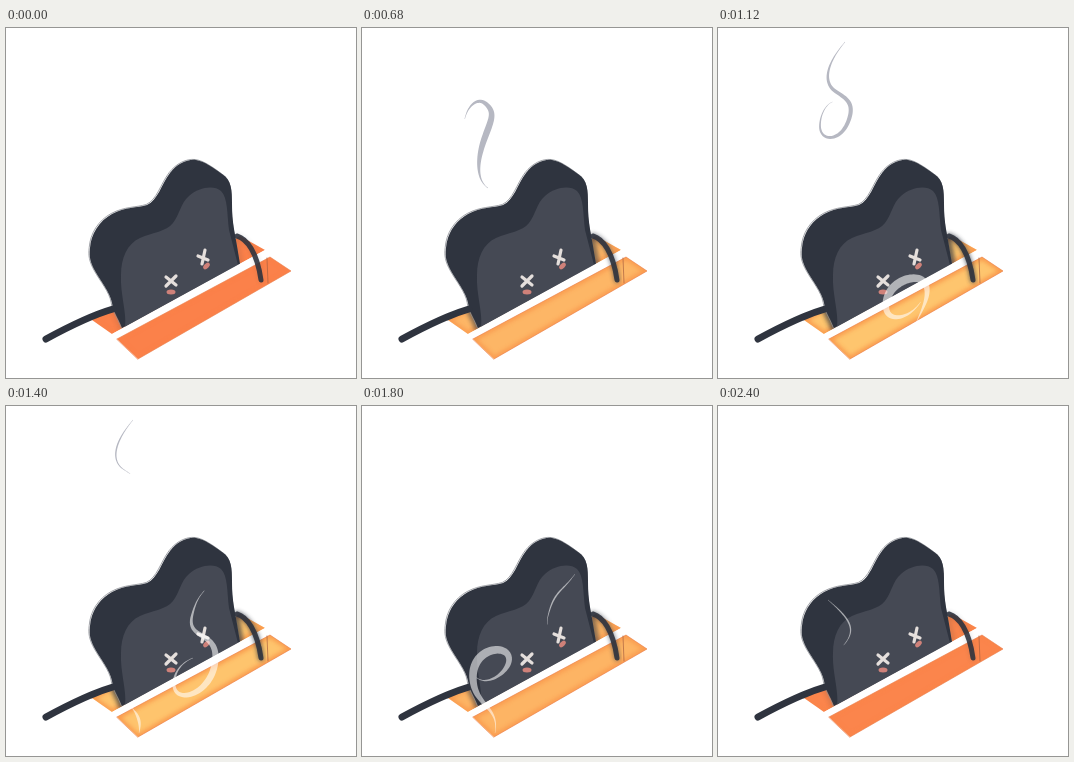
These frames come from a looping animation (350x350 px, 2440 ms). An HTML page:

```html
<!DOCTYPE html>
<html lang="en">
<head>
<meta charset="utf-8">
<title>Burnt toast</title>
<style>
  html, body { margin: 0; width: 100%; height: 100%; overflow: hidden; background: #fff; }
  svg { display: block; width: 100vw; height: 100vh; }
  .line { fill: none; stroke-linecap: round; stroke-linejoin: round; }
</style>
</head>
<body>
<svg viewBox="0 0 350 350">
  <defs>
    <filter id="soft" x="-20%" y="-20%" width="140%" height="140%"><feGaussianBlur stdDeviation="2"/></filter>
    <path id="back" d="M86 292 105 281 234 208 259 222 106 306Z"/>
    <path id="front" d="M111 311 264 229 285 243 132 331Z"/>
    <path id="bread" d="M116 300C112 289 107 284 106 275C104 264 95 254 89 243C84 234 83 228 84 220C85 206 93 193 106 186C119 179 131 180 141 177C152 172 155 157 164 145C171 136 181 131 190 132C198 133 208 140 216 146C226 152 226 163 226 176C226 195 229 205 231 218L234 236Z"/>
    <path id="arm" class="line" d="M231 208C241 211 251 224 255 252"/>
    <clipPath id="inBack"><use href="#back"/></clipPath>
    <clipPath id="inFront"><use href="#front"/></clipPath>
  </defs>

  <g class="heat"><use href="#back"/></g>
  <g clip-path="url(#inBack)">
    <use class="edge line" href="#back" stroke="#f8853d" stroke-width="5" filter="url(#soft)"/>
    <use class="edge line" href="#bread" stroke="#2f343f" stroke-width="7" filter="url(#soft)"/>
  </g>

  <use href="#bread" class="line" stroke="#8b8d94" stroke-width=".8" transform="translate(-.8 -.5)"/>
  <use href="#bread" fill="#2f343f"/>
  <path fill="#454954" d="M119 299C121 285 114 266 115 247C115 230 121 216 134 210C147 204 160 204 167 195C174 186 174 176 183 168C193 159 208 157 215 163C222 170 221 186 223 202L232 237Z"/>

  <path fill="#fff" d="M106 306 259 222 264 229 111 311Z"/>
  <g class="heat"><use href="#front"/></g>
  <g clip-path="url(#inFront)">
    <use class="edge line" href="#front" stroke="#f8853d" stroke-width="5" filter="url(#soft)"/>
  </g>
  <use class="line" href="#front" stroke="#e97c4a" stroke-width=".6"/>
  <path class="line" d="M261 230 262 255" stroke="#a9603f" stroke-width=".7"/>

  <use class="edge" href="#arm" stroke="#2f343f" stroke-width="6" filter="url(#soft)"/>
  <use href="#arm" stroke="#2f343f" stroke-width="5" opacity=".9"/>
  <path class="line" d="M40 311C62 299 83 288 107 281" stroke="#2f343f" stroke-width="7"/>

  <g class="line" stroke="#e5dfdc" stroke-width="3.2">
    <path d="M160 249 170 257M170 248 160 258"/>
    <path d="M199 222 196 236M192 228 202 232"/>
  </g>
  <g fill="#cf8179">
    <ellipse cx="165" cy="264" rx="4.5" ry="2.5"/>
    <ellipse cx="200.5" cy="238" rx="4" ry="2.3" transform="rotate(-45 200.5 238)"/>
  </g>

  <path class="wisp" data-start="340" data-width="6" fill="#b6b8c2"/>
  <path class="wisp" data-start="720" data-width="8" fill="#fff" opacity=".58"/>
  <path class="wisp" data-start="1320" data-width="8" fill="#fff" opacity=".56"/>
</svg>
<script>
const LOOP = 2440;
const TRAVEL = 740; // time for an end of a wisp to run along its route
const LAG = 500;    // delay of the tail behind the head
const SAMPLES = 90;

const routes = [
  "M126 160C114 152 115 132 122 112S134 85 124 76S102 82 102 98S122 114 130 94S127 70 117 63S105 40 127 14",
  "M197 297C205 280 213 266 207 255S170 252 168 276S204 290 209 257S180 235 186 210S200 186 213 168",
  "M133 327C138 300 112 300 111 272S140 238 146 249S132 278 119 274S112 255 125 240S135 215 110 194"
];

const wisps = [...document.querySelectorAll(".wisp")].map((node, i) => {
  const route = document.createElementNS("http://www.w3.org/2000/svg", "path");
  route.setAttribute("d", routes[i]);
  return { node, route, length: route.getTotalLength(), start: +node.dataset.start, width: +node.dataset.width };
});
const heated = document.querySelectorAll(".heat");
const edges = document.querySelectorAll(".edge");

const clamp = v => Math.max(0, Math.min(1, v));
const mix = (a, b, k) => `rgb(${a.map((v, i) => Math.round(v + (b[i] - v) * k))})`;

// Outline of the visible part of a route, pointed at both ends
function ribbon({ route, length, start, width }, t) {
  const head = clamp((t - start) / TRAVEL);
  const tail = clamp((t - start - LAG) / TRAVEL);
  const span = head - tail;
  if (span <= 0) return "";
  const thickness = width * Math.min(1, span * 3) * (1 - tail);
  const left = [], right = [];
  for (let i = 0; i <= SAMPLES; i++) {
    const s = i / SAMPLES;
    const at = (tail + span * s) * length;
    const p = route.getPointAtLength(at);
    const a = route.getPointAtLength(Math.max(0, at - .5));
    const b = route.getPointAtLength(Math.min(length, at + .5));
    const half = thickness / 2 * Math.sin(Math.PI * s) ** 1.5 + .2;
    const scale = half / (Math.hypot(b.x - a.x, b.y - a.y) || 1);
    const nx = (a.y - b.y) * scale, ny = (b.x - a.x) * scale;
    left.push(`${p.x + nx} ${p.y + ny}`);
    right.unshift(`${p.x - nx} ${p.y - ny}`);
  }
  return `M${left.concat(right).join("L")}Z`;
}

// Poses hold for 80, 40 and 80 ms in turn
function stepped(t) {
  const r = t % 200;
  return t - r + (r < 80 ? 0 : r < 120 ? 80 : 120);
}

function draw(now) {
  const t = stepped(now % LOOP);
  const glow = Math.sin(Math.PI * t / LOOP);
  heated.forEach(el => el.setAttribute("fill", mix([251, 129, 74], [254, 198, 110], glow)));
  edges.forEach(el => el.setAttribute("opacity", .1 + .6 * glow));
  wisps.forEach(wisp => wisp.node.setAttribute("d", ribbon(wisp, t)));
}

const begin = performance.now();
function tick() {
  draw(performance.now() - begin);
  requestAnimationFrame(tick);
}
tick();
</script>
</body>
</html>
```
